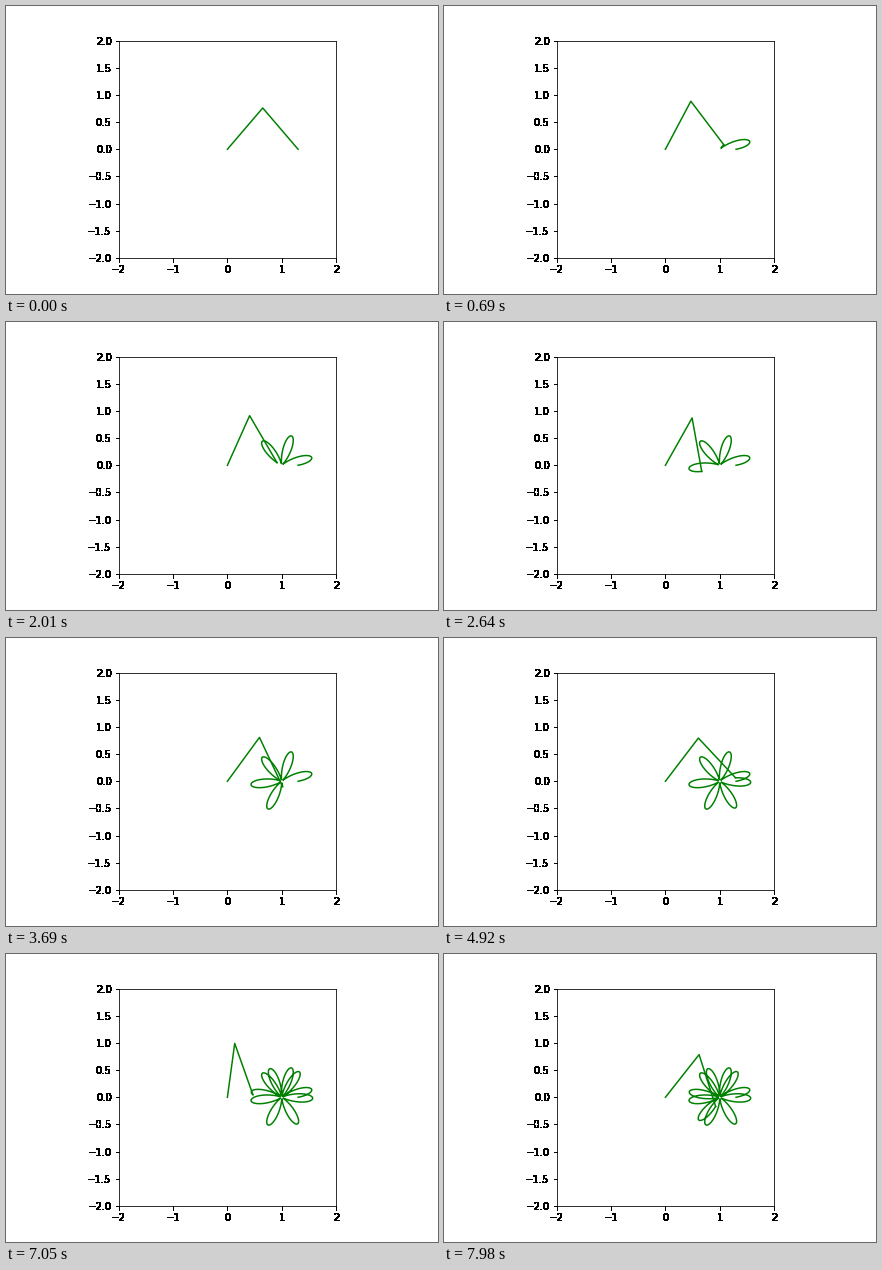
Write a matplotlib script that moves like this. It is 432x288 px and loops after 8 s.

```python
import numpy as np
import matplotlib.pyplot as plt
from matplotlib.animation import FuncAnimation

LOOP_MS = 8000
FRAMES = 267
STEP = 100 / 399          # phase advance per step
LINK = 1.0                # both arm links have this length

plt.rcParams.update({
    "font.family": "DejaVu Sans",
    "font.size": 10,
    "figure.subplot.bottom": 0.125,
})


def flower(phase):
    """Rose around (1, 0) whose petals precess by one radian each."""
    radius = 0.3 + 0.27 * np.sin(phase)
    angle = phase / (2 * np.pi)
    return 1 + radius * np.cos(angle), radius * np.sin(angle)


def elbow(x, y):
    """Upper elbow position of the two-link arm reaching (x, y)."""
    bend = np.arccos(np.hypot(x, y) / (2 * LINK))
    angle = np.arctan2(y, x) + bend
    return LINK * np.cos(angle), LINK * np.sin(angle)


def harden(image, dpi):
    """Turn every touched pixel opaque, giving heavy, unsmoothed marks."""
    image = image.copy()
    image[..., 3] = image[..., 3] > 0
    return image, 0, 0


fig, ax = plt.subplots(figsize=(6, 4), dpi=72, facecolor="white")
ax.set_xlim(-2, 2)
ax.set_ylim(-2, 2)
ax.set_aspect("equal")
for part in (ax.xaxis, ax.yaxis):
    part.set_agg_filter(harden)

arm, = ax.plot([], [], color="green", lw=1.5)
trace, = ax.plot([], [], color="green", lw=1.5)


def draw(frame):
    step = max(0, frame - 1)
    xs, ys = flower(STEP * np.arange(step + 1))
    ex, ey = elbow(xs[-1], ys[-1])
    arm.set_data([0, ex, xs[-1]], [0, ey, ys[-1]])
    trace.set_data(xs, ys)
    return arm, trace


def reset():
    return draw(0)


anim = FuncAnimation(fig, draw, frames=FRAMES, init_func=reset,
                     interval=LOOP_MS / FRAMES, repeat=True, repeat_delay=0)
plt.show()
```
